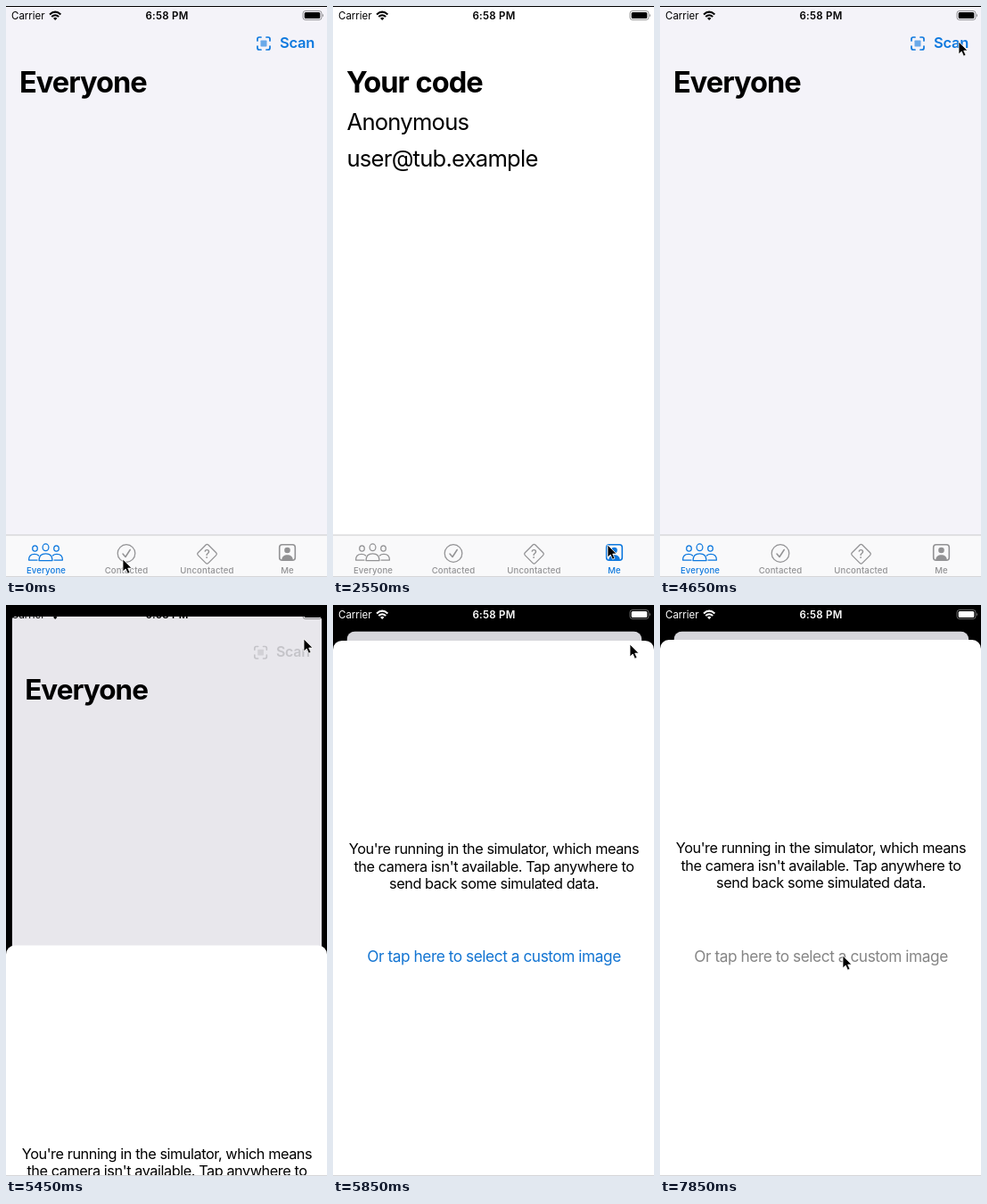
Write an HTML page that moves like this. It is 360 px wide and 640 px high and loops after 8000 ms.

```html
<!DOCTYPE html>
<html lang="en">
<head>
<meta charset="utf-8">
<title>Contacts app</title>
<style>
  html, body { margin: 0; width: 100%; height: 100%; overflow: hidden; background: #000; }
  svg { display: block; width: 360px; height: 640px; }
  text { font-family: Inter, "Liberation Sans", sans-serif; font-optical-sizing: none; }
  .title { font-size: 32.6px; font-weight: 700; letter-spacing: -.03em; word-spacing: .03em; }
  .field { font-size: 25.6px; letter-spacing: -.03em; }
  .scan { font-size: 16.5px; font-weight: 600; letter-spacing: -.015em; }
  .tab { font-size: 9.6px; font-weight: 500; letter-spacing: .012em; text-anchor: middle; }
  .status { font-size: 11.5px; }
  .clock { font-weight: 600; letter-spacing: .02em; text-anchor: middle; }
  .body { font-size: 16.3px; letter-spacing: -.027em; text-anchor: middle; }
  .link { font-size: 17.3px; letter-spacing: -.026em; text-anchor: middle; }
  .line { fill: none; stroke: currentColor; stroke-width: 1.25; stroke-linecap: round; stroke-linejoin: round; }
</style>
</head>
<body>
<svg viewBox="0 0 360 640">
  <defs>
    <clipPath id="cardClip"><rect id="cardShape" width="360" height="640"/></clipPath>
    <g id="sidePerson" class="line">
      <ellipse cx="32.5" cy="608" rx="2.8" ry="3.2"/>
      <path d="M35 621H25.6C25.6 616.6 28.2 614.4 32 614.4Q35 614.4 36.6 616"/>
    </g>
  </defs>
  <rect width="360" height="640"/>

  <g id="card" clip-path="url(#cardClip)">
    <rect id="page" width="360" height="640"/>
    <text id="title" class="title" x="15" y="97"></text>
    <g id="profile">
      <text class="field" x="15.5" y="139">Anonymous</text>
      <text class="field" x="15.5" y="180">user@tub.example</text>
    </g>
    <g id="scan">
      <path class="line" style="stroke-width:1.7" d="M282 39V37Q282 35 284 35H286M292 35H294Q296 35 296 37V39M296 45V47Q296 49 294 49H292M286 49H284Q282 49 282 47V45"/>
      <rect x="285.5" y="38.5" width="7" height="7" rx=".8" fill="currentColor" opacity=".6"/>
      <text class="scan" x="307" y="47.4" fill="currentColor">Scan</text>
    </g>

    <rect y="593" width="360" height="47" fill="#f9f9fa"/>
    <rect y="592.5" width="360" height="1" fill="#c9c9cc"/>
    <g class="item">
      <ellipse class="line" cx="44.5" cy="606.8" rx="3.4" ry="3.9"/>
      <path class="line" d="M37 621.5C37 616.4 40 613.8 44.5 613.8S52 616.4 52 621.5Z"/>
      <use href="#sidePerson"/>
      <use href="#sidePerson" transform="translate(89 0) scale(-1 1)"/>
      <text class="tab" x="45" y="636" fill="currentColor">Everyone</text>
    </g>
    <g class="item">
      <circle class="line" cx="135" cy="613.5" r="9.8"/>
      <path class="line" style="stroke-width:1.5" d="M131 614L134 617.5L139.2 609.5"/>
      <text class="tab" x="135" y="636" fill="currentColor">Contacted</text>
    </g>
    <g class="item">
      <rect class="line" x="217.3" y="606" width="16.4" height="16.4" rx="2" transform="rotate(45 225.5 614.2)"/>
      <text x="225.5" y="619" font-size="13" font-weight="500" text-anchor="middle" fill="currentColor">?</text>
      <text class="tab" x="225.5" y="636" fill="currentColor">Uncontacted</text>
    </g>
    <g class="item">
      <rect class="line" style="stroke-width:1.6" x="306.7" y="603.7" width="17.6" height="17.6" rx="3"/>
      <circle cx="315.5" cy="610" r="3.3" fill="currentColor"/>
      <path d="M309.2 621C309.2 617 312 615.2 315.5 615.2S321.8 617 321.8 621Z" fill="currentColor"/>
      <text class="tab" x="315.5" y="636" fill="currentColor">Me</text>
    </g>
    <rect id="dim" width="360" height="640"/>
  </g>

  <g id="sheet">
    <rect width="360" height="700" rx="10" fill="#fff"/>
    <text class="body" x="180.5" y="239.3">You're running in the simulator, which means</text>
    <text class="body" x="180.5" y="258.8">the camera isn't available. Tap anywhere to</text>
    <text class="body" x="180.5" y="278.3">send back some simulated data.</text>
    <text id="link" class="link" x="180.5" y="360.5">Or tap here to select a custom image</text>
  </g>

  <g id="status">
    <text class="status" x="6" y="15" fill="currentColor">Carrier</text>
    <g fill="none" stroke="currentColor" stroke-width="2">
      <path d="M49 9.4Q55.2 3.8 61.4 9.4"/>
      <path d="M51.2 12Q55.2 8.4 59.2 12"/>
    </g>
    <path d="M53 13.7Q55.2 11.8 57.4 13.7L55.2 16Z" fill="currentColor"/>
    <text class="status clock" x="180.5" y="15" fill="currentColor">6:58 PM</text>
    <rect x="333" y="5.5" width="21" height="10" rx="2.8" fill="none" stroke="currentColor" opacity=".4"/>
    <rect x="334.7" y="7.1" width="17.6" height="6.8" rx="1.5" fill="currentColor"/>
    <path d="M355 8.7Q357 10.5 355 12.3Z" fill="currentColor" opacity=".45"/>
  </g>

  <rect width="360" height="1"/>
  <rect y="639" width="360" height="1" fill="#d6d6d8"/>
  <path id="cursor" d="M0 0V14L3.2 11L5.5 16.2L8 15.1L5.7 10.1H10Z" stroke="#fff" stroke-width=".8" stroke-linejoin="round"/>
</svg>

<script>
const LOOP = 8000, STEP = 50;
const BLUE = '#0d78de', GREY = '#929294';
const $ = id => document.getElementById(id);
const items = document.querySelectorAll('.item');

// start time, selected tab
const tabs = [[0, 0], [350, 1], [1250, 2], [2050, 3], [3550, 0]];
const titles = ['Everyone', 'Contacted people', 'Uncontacted people', 'Your code'];

// time, x, y of the pointer tip
const path = [
  [0, 131, 620], [450, 131, 620], [1050, 213, 615], [1450, 213, 615],
  [1900, 308, 604], [2550, 308, 604], [2700, 311, 605], [2800, 311, 605],
  [3450, 45, 608], [3800, 45, 608], [4500, 338, 28], [4650, 335, 40],
  [4800, 334, 38], [5500, 334, 38], [5700, 333, 44], [6000, 333, 44],
  [6150, 304, 175], [6650, 79, 405], [7000, 186, 392], [7050, 186, 410],
  [7550, 186, 410], [7700, 205, 393], [LOOP, 205, 393]
];

const clamp = v => Math.max(0, Math.min(1, v));
const smooth = v => v * v * (3 - 2 * v);

function pointer(t) {
  const i = path.findIndex(k => k[0] > t);
  const [t0, x0, y0] = path[i - 1], [t1, x1, y1] = path[i];
  const k = smooth((t - t0) / (t1 - t0));
  return [x0 + (x1 - x0) * k, y0 + (y1 - y0) * k];
}

// critically damped spring
function rise(t) {
  const w = Math.max(0, t - 5370) * .0183;
  return 1 - (1 + w) * Math.exp(-w);
}

function draw(t) {
  const tab = tabs.filter(k => k[0] <= t).pop()[1];
  const me = tab === 3;
  $('page').setAttribute('fill', me ? '#fff' : '#f4f3f9');
  $('title').textContent = titles[tab];
  $('profile').style.display = me ? '' : 'none';
  items.forEach((el, i) => el.style.color = i === tab ? BLUE : GREY);

  const scan = $('scan');
  scan.style.display = me ? 'none' : '';
  scan.style.color = t < 5350 ? BLUE : '#cfced3';
  scan.style.opacity = t >= 5100 && t < 5350 ? .3 : 1;

  const p = rise(t);
  $('card').setAttribute('transform', `translate(${15.5 * p} ${29.5 * p}) scale(${1 - .081 * p})`);
  $('cardShape').setAttribute('rx', 10 * p);
  $('dim').setAttribute('opacity', .12 * p);
  $('sheet').setAttribute('transform', `translate(0 ${640 - 601 * p})`);
  $('sheet').style.display = p > 0 ? '' : 'none';
  $('link').setAttribute('fill', t < 7850 ? '#1274d2' : '#858585');

  const c = Math.round(255 * clamp((t - 5450) / 250));
  $('status').style.color = `rgb(${c},${c},${c})`;

  $('cursor').setAttribute('transform', `translate(${pointer(t)})`);
}

const start = performance.now();
function tick() {
  const t = (performance.now() - start) % LOOP;
  draw(Math.floor(t / STEP) * STEP);
  requestAnimationFrame(tick);
}
tick();
</script>
</body>
</html>
```
